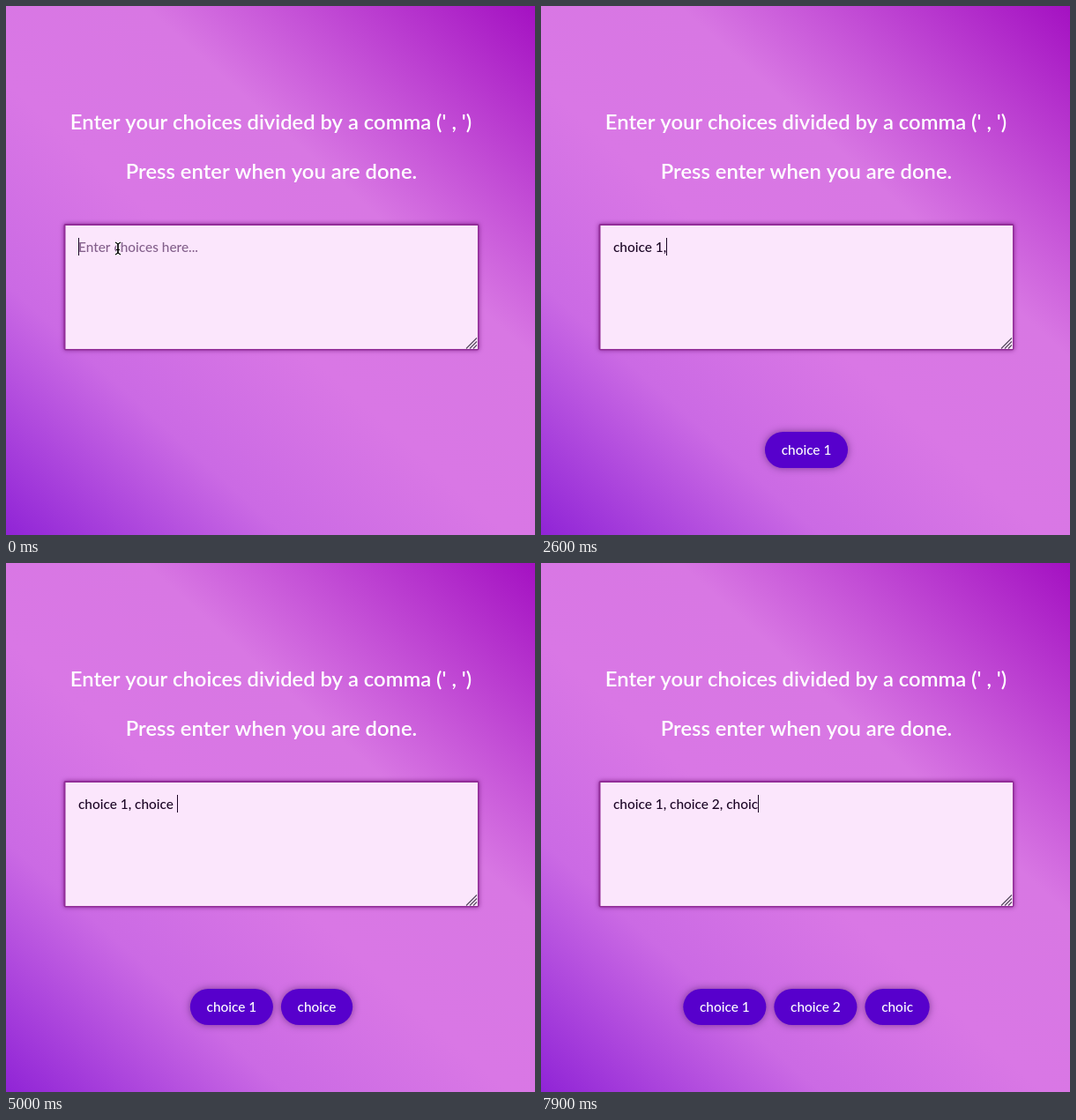
Animation, 600 px wide and 600 px high, one loop 8000 ms. Source, as an HTML page with a canvas:

```html
<!DOCTYPE html>
<html lang="en">
<head>
<meta charset="utf-8">
<title>Choice picker</title>
<style>
  html, body { margin: 0; width: 100%; height: 100%; overflow: hidden; }
  body { background: linear-gradient(42deg, #9024d6, #cb6ae4 25%, #d977e5 45%, #d877e3 65%, #a411c2); }
  canvas { display: block; }
</style>
</head>
<body>
<canvas id="stage" width="600" height="600"></canvas>
<script>
const ctx = document.getElementById('stage').getContext('2d');
const LOOP = 8000;
const BLINK = 490;
const PILL_LAG = 90;
const INK = '#1c0626';
const BODY_FONT = '500 15.4px Lato, "Open Sans", sans-serif';
const HEADING_FONT = '600 23.8px Lato, "Open Sans", sans-serif';

// Each burst types its characters at a steady pace, in ms.
const bursts = [
  { text: 'choice 1', start: 350, pace: 240 },
  { text: ', ', start: 2600, pace: 100 },
  { text: 'choice', start: 3000, pace: 280 },
  { text: ' 2,', start: 4900, pace: 200 },
  { text: ' ch', start: 6000, pace: 200 },
  { text: 'oic', start: 7300, pace: 200 }
];
const keys = bursts.flatMap(({ text, start, pace }) =>
  [...text].map((char, i) => ({ char, time: start + i * pace })));

const keysBefore = time => keys.filter(key => key.time <= time);
const textAt = time => keysBefore(time).map(key => key.char).join('');

function write(text, x, baseline, color, font = BODY_FONT, align = 'left') {
  ctx.font = font;
  ctx.textAlign = align;
  ctx.fillStyle = color;
  ctx.fillText(text, x, baseline);
}

function textWidth(text) {
  ctx.font = BODY_FONT;
  return ctx.measureText(text).width;
}

function shadowedBox(x, y, width, height, radius, color, shadow, blur) {
  ctx.save();
  ctx.shadowColor = shadow;
  ctx.shadowBlur = blur;
  ctx.fillStyle = color;
  ctx.beginPath();
  ctx.roundRect(x, y, width, height, radius);
  ctx.fill();
  ctx.restore();
}

function strokeLine(points, color, width) {
  ctx.strokeStyle = color;
  ctx.lineWidth = width;
  ctx.beginPath();
  points.forEach(([x, y]) => ctx.lineTo(x, y));
  ctx.stroke();
}

function drawTextarea() {
  shadowedBox(65.5, 247, 471, 143.5, 2, '#922d98', 'rgba(90, 0, 100, .6)', 5);
  ctx.fillStyle = '#fbe6fc';
  ctx.fillRect(67.5, 249, 467.5, 140);
  for (let size = 4; size <= 12; size += 4) {
    strokeLine([[534 - size, 388.5], [534, 388.5 - size]], '#51445a', 1.1);
  }
}

function drawPointer(x, y) {
  for (const [color, width] of [['#fff', 3], ['#000', 1.2]]) {
    for (const side of [-1, 1]) {
      for (const end of [-1, 1]) {
        strokeLine([[x, y], [x, y + 5 * end], [x + 3 * side, y + 7 * end]], color, width);
      }
    }
    strokeLine([[x - 2, y + 1.5], [x + 2, y + 1.5]], color, width);
  }
}

function drawPills(text) {
  const gap = 9, height = 41, padding = 18.7, top = 483;
  const pills = text.split(',').map(part => part.trim()).filter(Boolean)
    .map(label => ({ label, width: textWidth(label) + padding * 2 }));
  const total = pills.reduce((sum, pill) => sum + pill.width + gap, -gap);
  let x = 301 - total / 2;
  for (const { label, width } of pills) {
    shadowedBox(x, top, width, height, height / 2, '#5700cc', 'rgba(40, 0, 70, .5)', 9);
    write(label, x + padding, 509.3, '#fff');
    x += width + gap;
  }
}

function drawCaret(time, text) {
  const lastKey = keysBefore(time).at(-1);
  const idle = time - (lastKey ? lastKey.time : 0);
  if (Math.floor(idle / BLINK) % 2) return;
  ctx.fillStyle = INK;
  ctx.fillRect(Math.round(82 + textWidth(text)), 263, 1, 20);
}

function draw(time) {
  const text = textAt(time);
  ctx.clearRect(0, 0, 600, 600);
  write("Enter your choices divided by a comma (' , ')", 300.5, 139.5, '#fff', HEADING_FONT, 'center');
  write('Press enter when you are done.', 301, 195.8, '#fff', HEADING_FONT, 'center');
  drawTextarea();
  write(text || 'Enter choices here...', 82, 278.5, text ? INK : '#84608c');
  if (!text) drawPointer(127, 275);
  drawCaret(time, text);
  drawPills(textAt(time - PILL_LAG));
}

const start = performance.now();
function tick() {
  draw((performance.now() - start) % LOOP);
  requestAnimationFrame(tick);
}
tick();
</script>
</body>
</html>
```
